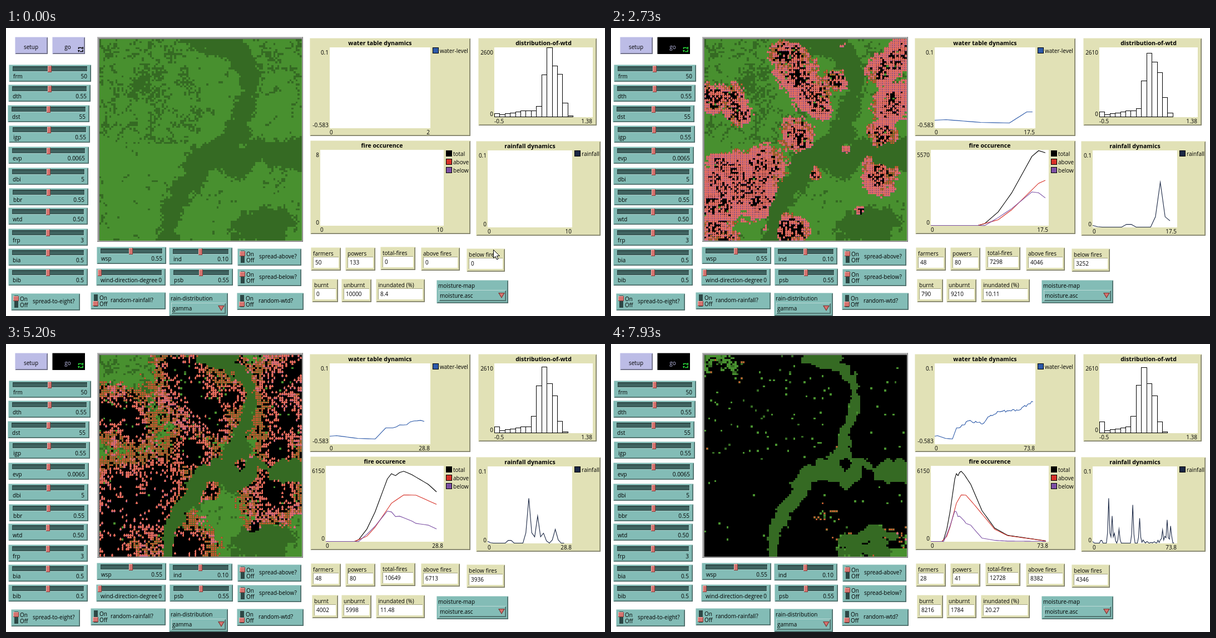
An HTML page with a canvas for the animation above (8000 ms loop, 1077 px wide and 520 px high).

```html
<!DOCTYPE html>
<html lang="en">
<head>
<meta charset="utf-8">
<title>Fire model</title>
<style>
html, body { margin: 0; height: 100%; overflow: hidden; background: #fff; }
canvas { display: block; }
</style>
</head>
<body>
<canvas id="stage" width="1077" height="520"></canvas>
<script>
const g = document.getElementById('stage').getContext('2d');
const LOOP = 8000, STEP = 1000 / 15, N = 100, SIZE = 3.64, LEFT = 167.5, TOP = 20;
const TEAL = '#83bcb6', BEIGE = '#e1e1b6', LILAC = '#bcbce6', SLOT = '#3f6360', KNOB = '#d6736f';
const BLUE = '#2d5aa9', RED = '#d73229', VIOLET = '#7c50a4', NAVY = '#1a2744';
const LIGHT_LAND = '#48902f', DARK_LAND = '#356a23';

// Piecewise linear function through x, y pairs
const curve = (...p) => x => {
  if (x <= p[0]) return p[1];
  for (let i = 2; i < p.length; i += 2)
    if (x <= p[i]) return p[i - 1] + (p[i + 1] - p[i - 1]) * (x - p[i - 2]) / (p[i] - p[i - 2]);
  return p[p.length - 1];
};
const hash = (x, y, seed) => {
  const s = Math.sin(x * 127.1 + y * 311.7 + seed * 74.7) * 43758.5453;
  return s - Math.floor(s);
};
function noise(x, y, seed) {
  const i = Math.floor(x), j = Math.floor(y), u = x - i, v = y - j;
  const mix = (a, b, t) => a + (b - a) * t;
  return mix(mix(hash(i, j, seed), hash(i + 1, j, seed), u),
    mix(hash(i, j + 1, seed), hash(i + 1, j + 1, seed), u), v);
}

// ---- model over ticks ----
const tickAt = curve(1130, 0, 1800, 12, 2730, 17, 3730, 21, 5200, 27, 6530, 40, 7930, 72);

const level = curve(0, 14, 2, 15, 8, 10, 13, 9, 16, 29, 18, 29, 25, 42, 36, 36, 39, 48, 47, 58, 62, 62, 72, 77);
const water = n => level(n) + (n > 18 ? 4 * (hash(n, 0, 11) - .5) : 0);

// Showers: tick, height; light drizzle late on
const showers = [[0, 3], [7.5, 8], [14, 81], [17, 49], [19, 18], [23, 25], [35, 69], [41, 45], [61, 24], [65, 42], [68, 31]];
const rain = n => Math.max(n > 42 ? 14 * hash(n, 1, 12) ** 2 : 0,
  ...showers.map(([at, h]) => h * (1 - Math.abs(n - at) / 1.3)));

const total = curve(7, 0, 8, 134, 10, 994, 12, 2382, 15, 5064, 16, 5490, 17, 5335, 18, 5591, 19, 5690,
  21, 5410, 25, 4625, 32, 2500, 40, 1078, 48, 500, 72, 45);
const above = curve(7, 0, 10, 420, 12, 1147, 16, 3093, 19, 3770, 22, 3750, 27, 3008, 40, 988, 48, 470, 72, 40);
const below = n => total(n) - above(n);

const farmers = curve(0, 50, 12, 48, 27, 48, 40, 28);
const powers = curve(0, 133, 12, 80, 27, 80, 40, 41);
const aboveSum = curve(7, 0, 12, 1187, 17, 4046, 21, 5407, 27, 6713, 40, 8089, 72, 8382);
const belowSum = curve(7, 0, 12, 1308, 17, 3252, 21, 3718, 27, 3936, 40, 4305, 72, 4346);
const burnt = curve(7, 0, 12, 103, 17, 790, 21, 1878, 27, 4002, 40, 7103, 72, 8216);
const inundated = curve(0, 8.4, 12, 8.08, 17, 10.11, 21, 11.19, 27, 11.48, 40, 12.31, 72, 20.27);

// Histogram: one hump sliding over a low shelf
const hump = curve(-3, 0, -2, 19, -1, 76, 0, 125, 1, 92, 2, 77, 3, 25, 4, 2, 5, 0);
const humpAt = curve(0, 10, 12, 10.2, 17, 9.2, 21, 8.95, 40, 8.5, 72, 7.8);
function bar(i, n) {
  const at = humpAt(n), shelf = i > at ? 0 : i ? Math.min(11, 2 + 1.8 * i) : 6 + n / 5;
  return Math.max(shelf, hump(i - at));
}

// ---- landscape and fire order ----
// Wet channels: x, y, radius
const channels = [
  [[50, 0, 3.5], [62, 2, 4], [72, 11, 2.5], [74, 20, 2.3], [73, 29, 2.3], [69, 38, 2.5], [68, 48, 4], [62, 56, 6],
    [50, 59, 5], [46, 68, 4], [35, 84, 2.7], [33, 101, 2.2]],
  [[62, 56, 6], [70, 59, 6], [77, 53, 2.5], [83, 56, 1], [88, 57, 5], [99, 57, 5.5]],
  [[68, 92, 1.5], [82, 88, 4], [92, 89, 2]],
  [[67, 98, 1], [86, 95, 3]]];
function wetness(x, y) {
  let wet = -99;
  for (const line of channels) for (let i = 1; i < line.length; i++) {
    const [ax, ay, ar] = line[i - 1], [bx, by, br] = line[i], dx = bx - ax, dy = by - ay;
    const t = Math.max(0, Math.min(1, ((x - ax) * dx + (y - ay) * dy) / (dx * dx + dy * dy)));
    wet = Math.max(wet, ar + (br - ar) * t - Math.hypot(x - ax - dx * t, y - ay - dy * t));
  }
  return Math.min(wet, Math.hypot(x - 70, y - 53) - 3.5);
}

// Fire clusters: x, y, speed; each scatters three starts around itself
const clusters = [[41, 10, 4.5], [50, 21, 5], [65, 20, 2.5], [86, 15, 4], [96, 8, 4], [96, 32, 4.5], [88, 47, 3],
  [6, 26, 4], [14, 33, 4], [58, 32, 3], [43, 46, 4], [9, 65, 5], [24, 67, 5.5], [22, 79, 5.5], [6, 79, 5],
  [83, 69, 4.5], [7, 96, 4.5], [42, 91, 4.5], [70, 55, 1.5], [55, 66, 1.4], [76, 85, 1.2], [66, 5, 1.5]];
const starts = clusters.flatMap(([x, y, v], i) => [0, 1, 2].map(k =>
  [x + 2 * v * (hash(i, k, 13) - .5), y + 2 * v * (hash(i, k, 14) - .5), v * (.7 + .3 * hash(i, k, 15))]));

const cells = [];
for (let y = 0; y < N; y++) for (let x = 0; x < N; x++) {
  const h = hash(x, y, 1), patch = noise(x / 3.5, y / 3.5, 2), wet = wetness(x, y);
  const wet2 = wet + 3.5 * (noise(x / 3, y / 3, 3) - .5);
  const north = y < 52, speckle = north && x < 50 ? .62 : north && x > 74 && y < 30 ? .67 : .8;
  const thicket = .18 * Math.exp(-((x - 18) ** 2 + (y - 19) ** 2) / 45);
  const hot = x < 34 && y > 56 && y < 90 || x > 84 && y < 45 || x > 88 && y > 72;
  let arrival = Math.min(...starts.map(([sx, sy, v]) => Math.hypot(x - sx, y - sy) / v));
  arrival *= .7 + .3 * hash(x, y, 4) + .4 * noise(x / 5, y / 5, 5);
  if (wet2 > -1) arrival += (wet2 + 1) * 1.2;
  if (wet2 > 0) arrival += 12;
  if (x > 84 && y > 95) arrival += 11;
  if (hash(x, y, 6) < (north && x < 60 ? .022 : .006)) arrival += 60;
  const px = Math.round(LEFT + x * SIZE), py = Math.round(TOP + y * SIZE);
  cells.push({
    x: px, y: py, x2: Math.round(LEFT + (x + 1) * SIZE), y2: Math.round(TOP + (y + 1) * SIZE),
    dark: wet + 6 * (patch - .5) + 3 * (h - .5) > -2.4 || .55 * patch + .45 * h + thicket > speckle,
    arrival, hot, life: 6000 * hash(x, y, 9),
    mix: .5 * hash(x, y, 7) + .5 * (hot ? .15 : noise(x / 7, y / 7, 8))
  });
}
const rank = (key, name) => [...cells].sort((a, b) => a[key] - b[key]).forEach((c, i) => c[name] = i);
rank('arrival', 'lit');
const everLit = burnt(72) + above(72);
for (const c of cells) c.spent = c.lit + (c.lit < everLit ? c.life + (c.hot ? 600 : 0) : 1e5);
rank('spent', 'burn');

// ---- drawing helpers ----
function rect(x, y, x2, y2, fill) {
  g.fillStyle = fill;
  g.fillRect(x, y, x2 - x, y2 - y);
}
function text(s, x, y, align = 'left', color = '#000', bold = false) {
  g.font = (bold ? 'bold 10.6px' : '10px') + ' "Open Sans", "Noto Sans", sans-serif';
  g.textAlign = align;
  g.fillStyle = color;
  g.fillText(s, x, y + 4);
}
function panel(x, y, x2, y2, fill) {
  rect(x, y, x2, y2, fill);
  rect(x, y, x2, y + 1, 'rgba(255,255,255,.45)');
  rect(x, y, x + 1, y2, 'rgba(255,255,255,.45)');
  for (const i of [1, 2]) {
    const shade = `rgba(0,0,0,${.65 - .18 * i})`;
    rect(x + i, y2 - i, x2 - i + 1, y2 - i + 1, shade);
    rect(x2 - i, y + i, x2 - i + 1, y2 - i, shade);
  }
}
function shape(points, fill) {
  g.beginPath();
  points.forEach(p => g.lineTo(...p));
  g.closePath();
  g.fillStyle = fill;
  g.fill();
}
function knob(x, y, x2, y2) {
  rect(x, y, x2, y2, '#8a3f3c');
  rect(x, y, x2 - 1, y2 - 1, '#f0b4b0');
  rect(x + 1, y + 1, x2 - 1, y2 - 1, KNOB);
}
function slider(x, y, x2, label, value, thumb) {
  panel(x, y, x2, y + 31, TEAL);
  rect(x + 7, y + 3, x2 - 6, y + 13, '#a9d2cd');
  rect(x + 7, y + 3, x2 - 7, y + 12, '#2d4745');
  rect(x + 8, y + 5, x2 - 7, y + 11, SLOT);
  knob(thumb - 3, y + 2, thumb + 4, y + 14);
  text(label, x + 8, y + 21);
  text(value, x2 - 7, y + 21, 'right');
}
function toggle(x, y, x2, label, labelX, on) {
  panel(x, y, x2, y + 31, TEAL);
  rect(x + 6, y + 4, x + 13, y + 26, '#2d4745');
  const top = on ? y + 5 : y + 16;
  knob(x + 4, top, x + 14, top + 9);
  text('On', x + 16, y + 10);
  text('Off', x + 16, y + 21);
  text(label, labelX, y + 14);
}
function chooser(x, y, x2, label, value) {
  panel(x, y, x2, y + 42, TEAL);
  panel(x + 4, y + 18, x2 - 4, y + 38, TEAL);
  text(label, x + 3, y + 10);
  text(value, x + 6, y + 28);
  const cx = x2 - 12, cy = y + 28;
  shape([[cx - 6, cy - 5], [cx + 6, cy - 5], [cx, cy + 5]], '#7a3532');
  shape([[cx - 4, cy - 4], [cx + 4, cy - 4], [cx, cy + 3]], KNOB);
}
function monitor(x, y, x2, label, value) {
  panel(x, y, x2, y + 42, BEIGE);
  rect(x + 4, y + 17, x2 - 4, y + 37, '#a5a584');
  rect(x + 5, y + 18, x2 - 4, y + 37, '#fff');
  text(label, x + 4, y + 11);
  text(value, x + 8, y + 27);
}
function plot([x, y, x2, y2], [l, t, r, b], title, yMin, yMax, xMin, xMax) {
  panel(x, y, x2, y2, BEIGE);
  rect(l, t, r, b, '#fff');
  text(title, (l + r) / 2, t - 8, 'center', '#000', true);
  text(yMax, l - 2, t + 9, 'right');
  text(yMin, l - 2, b - 6, 'right');
  text(xMin, l, b + 6.5);
  text(xMax, r - 1, b + 6.5, 'right');
}
function legend(x, y, label, color) {
  rect(x, y, x + 11, y + 11, '#000');
  rect(x + 1, y + 1, x + 10, y + 10, color);
  text(label, x + 13, y + 6);
}
function trace(l, r, b, xMax, last, height, color) {
  g.beginPath();
  for (let i = 0; i <= last; i++) g.lineTo(l + i / xMax * (r - l), b - .5 - height(i));
  g.strokeStyle = color;
  g.lineWidth = 1.1;
  g.stroke();
}
// Plot axes grow when a value passes their end
function grow(start, n, value, factor) {
  let max = start;
  for (let i = 0; i <= n; i++) if (value(i) > max) max = value(i) * factor;
  return max;
}
const short = v => String(Number(v.toPrecision(3)));

// ---- scene parts ----
function controls(t) {
  const running = t >= 1000, ink = running ? '#2be03c' : '#000';
  panel(16, 16, 75, 47, LILAC);
  text('setup', 45, 34, 'center');
  panel(83, 16, 142, 47, running ? '#000' : LILAC);
  text('go', 111, 34, 'center', running ? LILAC : '#000');
  g.strokeStyle = ink;
  g.lineWidth = 1.5;
  g.beginPath();
  g.moveTo(130.5, 38); g.lineTo(130.5, 35.5); g.lineTo(136, 35.5);
  g.moveTo(138, 39); g.lineTo(138, 42.5); g.lineTo(133, 42.5);
  g.stroke();
  shape([[135, 37.5], [139.5, 37.5], [138.5, 33.5]], ink);
  shape([[129, 40], [133, 40], [130.5, 44]], ink);

  [[5, 66, 153, 'frm', '50', 78], [4, 102, 152, 'dth', '0.55', 78], [3, 139, 150, 'dst', '55', 76],
    [5, 176, 151, 'igp', '0.55', 77], [4, 214, 149, 'evp', '0.0065', 76], [4, 252, 148, 'dbi', '5', 76],
    [5, 289, 148, 'bbr', '0.55', 76], [4, 324, 147, 'wtd', '0.50', 75], [4, 362, 147, 'frp', '3', 75],
    [4, 398, 147, 'bia', '0.5', 75], [4, 434, 147, 'bib', '0.5', 75], [163, 395, 288, 'wsp', '0.55', 224],
    [162, 434, 287, 'wind-direction-degree', '0', 168], [293, 396, 407, 'ind', '0.10', 349],
    [294, 434, 408, 'psb', '0.55', 350]].forEach(s => slider(...s));

  toggle(416, 398, 531, 'spread-above?', 455, true);
  toggle(416, 435, 531, 'spread-below?', 455, true);
  toggle(415, 478, 535, 'random-wtd?', 454, false);
  toggle(9, 479, 133, 'spread-to-eight?', 48, true);
  toggle(152, 477, 287, 'random-rainfall?', 188, false);
  chooser(293, 478, 399, 'rain-distribution', 'gamma');
  chooser(774, 455, 903, 'moisture-map', 'moisture.asc');
}

function monitors(n) {
  const up = Math.round(aboveSum(n)), down = Math.round(belowSum(n)), gone = Math.round(burnt(n));
  monitor(548, 396, 602, 'farmers', Math.round(farmers(n)));
  monitor(610, 396, 664, 'powers', Math.round(powers(n)));
  monitor(673, 395, 736, 'total-fires', up + down);
  monitor(746, 396, 816, 'above fires', up);
  monitor(828, 398, 897, 'below fires', down);
  monitor(550, 453, 597, 'burnt', gone);
  monitor(603, 453, 657, 'unburnt', 10000 - gone);
  monitor(665, 453, 753, 'inundated (%)', Number(inundated(n).toFixed(2)));
}

function plots(n) {
  const id = i => i, longX = grow(10, n, id, 1.25), waterX = grow(2, n, id, 1.25);
  plot([546, 18, 835, 195], [582, 35, 763, 181], 'water table dynamics', '-0.583', '0.1', '0', short(waterX));
  legend(767, 35, 'water-level', BLUE);
  trace(582, 763, 181, waterX, n, water, BLUE);

  plot([849, 18, 1062, 176], [878, 35, 1055, 161], 'distribution-of-wtd', '0', n < 1 ? '2600' : '2610', '-0.5', '1.38');
  g.strokeStyle = '#000';
  g.lineWidth = 1;
  for (let i = 0; i < 16; i++) {
    const x = Math.round(878 + i * 9.41), x2 = Math.round(878 + (i + 1) * 9.41), h = Math.round(bar(i, n));
    if (h) g.strokeRect(x + .5, 160.5 - h, x2 - x, h);
  }

  const top = grow(8, n, total, 1.1), l = top < 1000 ? 565 : 575;
  plot([547, 203, 835, 372], [l, 220, 787, 357], 'fire occurence', '0', short(top), '0', short(longX));
  legend(791, 221, 'total', '#000');
  legend(791, 236, 'above', RED);
  legend(791, 251, 'below', VIOLET);
  if (n) [[total, '#000'], [above, RED], [below, VIOLET]].forEach(([f, color]) =>
    trace(l, 787, 357, longX, n, i => f(i) / top * 137, color));

  plot([845, 204, 1069, 375], [866, 221, 1018, 360], 'rainfall dynamics', '0', '0.1', '0', short(longX));
  legend(1022, 221, 'rainfall', NAVY);
  trace(866, 1018, 360, longX, n - 1, rain, NAVY);
}

function flame(x, y, base) {
  shape([[x + 2, y - 2], [x + 4, y + 1.2], [x + 3.4, y + 3.4], [x + .6, y + 3.4], [x, y + 1.2]], '#ee7263');
  rect(x + 1, y + 2.4, x + 3, y + 3.8, base);
}
function world(n) {
  const gone = burnt(n), lit = gone + above(n), ratio = below(n) / (above(n) || 1);
  rect(164, 16, 534, 386, '#6f6f6f');
  rect(164, 16, 533, 385, '#b4b4b4');
  rect(166, 18, 532, 384, '#858585');
  for (const c of cells) {
    const { x, y } = c, age = lit - c.lit, pink = c.mix < ratio;
    const ground = fill => rect(x, y, c.x2, c.y2, fill);
    if (age <= 0) ground(c.dark ? DARK_LAND : LIGHT_LAND);
    else if (c.burn < gone) ground('#000');
    else if (age > 2500) {
      ground('#000');
      flame(x, y, pink ? '#9a5aa8' : '#d8542f');
    } else if (pink) {
      ground('#80505c');
      rect(x, y + 1, c.x2, c.y2, '#a85c94');
      shape([[x + 1.8, y - 1.4], [x + 3.8, y + 2.2], [x + 1.8, y + 3.2], [x - .2, y + 2.2]], '#e9705f');
    } else {
      ground('#5c6a2a');
      rect(x + .6, y + .6, x + 3.1, y + 3.1, '#db5230');
    }
  }
}

// Pointer positions by time: from, x, y
const pointer = [[0, 876, 400], [70, 668, 274], [130, 460, 149], [200, 252, 23], [270], [530, 101, 19],
  [670, 104, 26], [730, 111, 38], [800, 112, 33], [1200]];
function cursor(t) {
  const [, x, y] = pointer.filter(p => p[0] <= t).pop();
  if (x === undefined) return;
  shape([[0, 0], [0, 15], [3.5, 12], [6, 17.5], [8.5, 16.5], [6, 11], [11, 11]]
    .map(([dx, dy]) => [x + .5 + dx, y + .5 + dy]), '#fff');
  g.strokeStyle = '#000';
  g.lineWidth = 1;
  g.stroke();
}

let shown = -1;
function play(now) {
  const step = Math.floor(now % LOOP / STEP + .1);
  if (step !== shown) {
    shown = step;
    const t = Math.round(step * STEP / 10) * 10, n = tickAt(t);
    rect(0, 0, 1077, 520, '#fff');
    controls(t);
    world(n);
    plots(Math.floor(n + .01));
    monitors(n);
    cursor(t);
  }
  requestAnimationFrame(play);
}
play(0);
</script>
</body>
</html>
```
